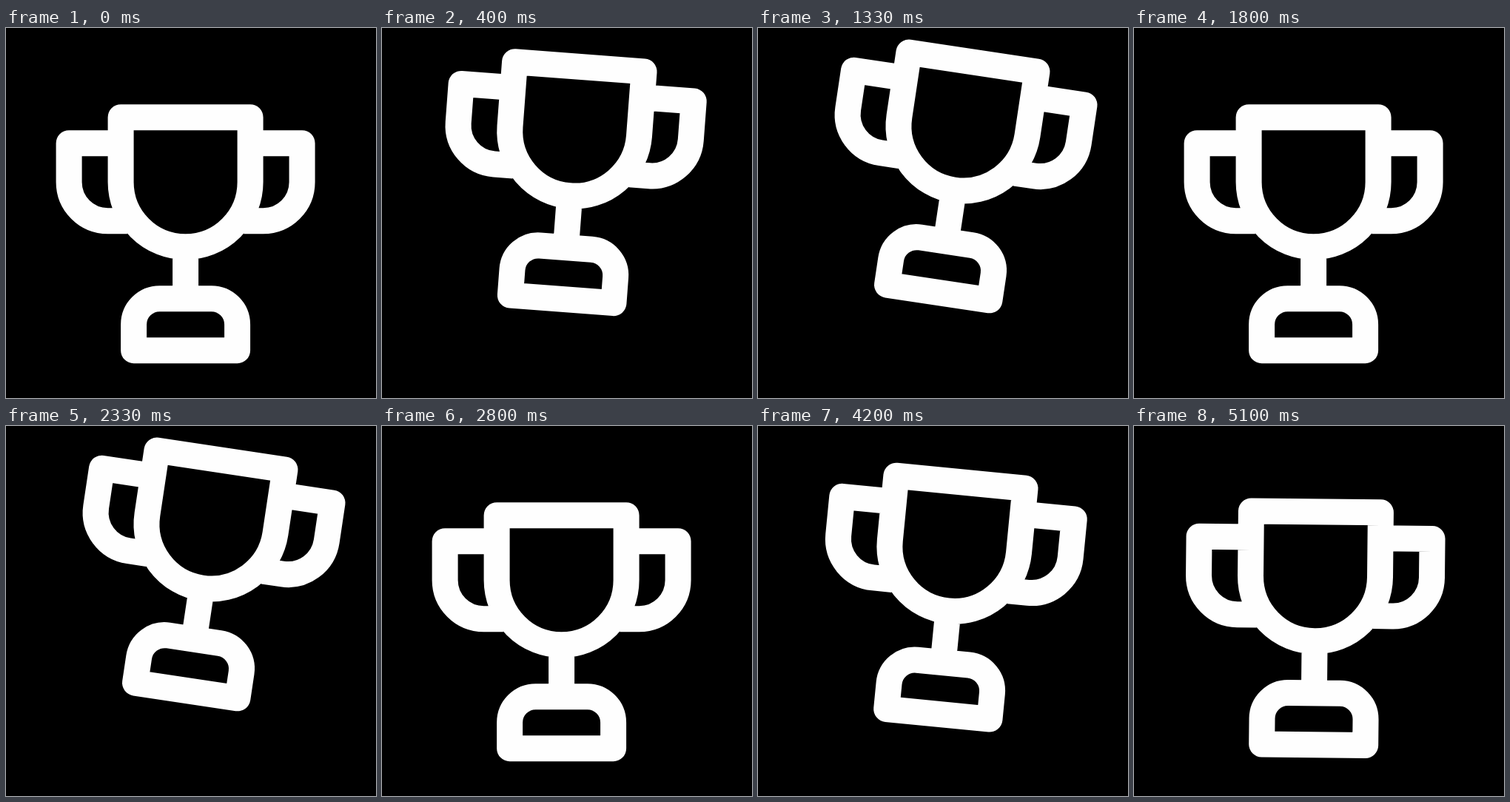
Recreate the animation shown at these times as an HTML page with a canvas. Size 500 px wide and 500 px high, loop 5.13 s.

```html
<!DOCTYPE html>
<html lang="en">
<head>
<meta charset="utf-8">
<title>Jumping trophy</title>
<style>
  html, body { margin: 0; width: 100%; height: 100%; overflow: hidden; background: #000; }
  canvas { display: block; }
</style>
</head>
<body>
<canvas id="stage" width="500" height="500"></canvas>
<script>
const ctx = document.getElementById('stage').getContext('2d');

const LOOP = 5130;
const UNIT = 17.5;                          // icon grid unit in pixels
const ORIGIN = { x: 32.6, y: 68.2 };        // top left of the icon grid
const PIVOT = { x: 242.6, y: 443.2 };       // just above the foot
const LAST_STEP = 15;

// Trophy on a 24-unit grid: cup, handles, stem, base
const trophy = new Path2D(
  'M7 3H17V8a5 5 0 0 1-10 0Z' +
  'M7 5H3V8a3 3 0 0 0 3 3H7.5' +
  'M17 5H21V8a3 3 0 0 1-3 3H16.5' +
  'M12 13V17' +
  'M8 21V19a2 2 0 0 1 2-2H14a2 2 0 0 1 2 2V21Z'
);

const keys = [
  { at: 0.25, lift: 0, angle: 0 },
  { at: 5.25, lift: 80.8, angle: 9.7 },
  { at: 10.25, lift: 40, angle: -9.45 },
  { at: LAST_STEP, lift: 0, angle: 0 }
];

const smooth = u => u * u * (3 - 2 * u);
const mix = (a, b, u) => a + (b - a) * u;

// Two poses per 100 ms: one at 0 ms, the next at 30 ms
function stepAt(time) {
  const phase = Math.floor(time) % 1000;
  if (phase < 100) return 0;
  const step = 2 * Math.floor(phase / 100) - 1 + (phase % 100 >= 30 ? 1 : 0);
  return Math.min(step, LAST_STEP);
}

function poseAt(step) {
  if (step <= keys[0].at) return keys[0];
  const next = keys.findIndex(key => key.at >= step);
  const a = keys[next - 1], b = keys[next];
  const u = smooth((step - a.at) / (b.at - a.at));
  return { lift: mix(a.lift, b.lift, u), angle: mix(a.angle, b.angle, u) };
}

function draw(time) {
  const { lift, angle } = poseAt(stepAt(time));
  ctx.fillStyle = '#000';
  ctx.fillRect(0, 0, 500, 500);
  ctx.save();
  ctx.translate(PIVOT.x, PIVOT.y - lift);
  ctx.rotate(angle * Math.PI / 180);
  ctx.translate(ORIGIN.x - PIVOT.x, ORIGIN.y - PIVOT.y);
  ctx.scale(UNIT, UNIT);
  ctx.lineWidth = 2;
  ctx.lineJoin = 'round';
  ctx.strokeStyle = '#fefefe';
  ctx.stroke(trophy);
  ctx.restore();
}

const start = performance.now();
function tick() {
  draw((performance.now() - start) % LOOP);
  requestAnimationFrame(tick);
}
tick();
</script>
</body>
</html>
```
